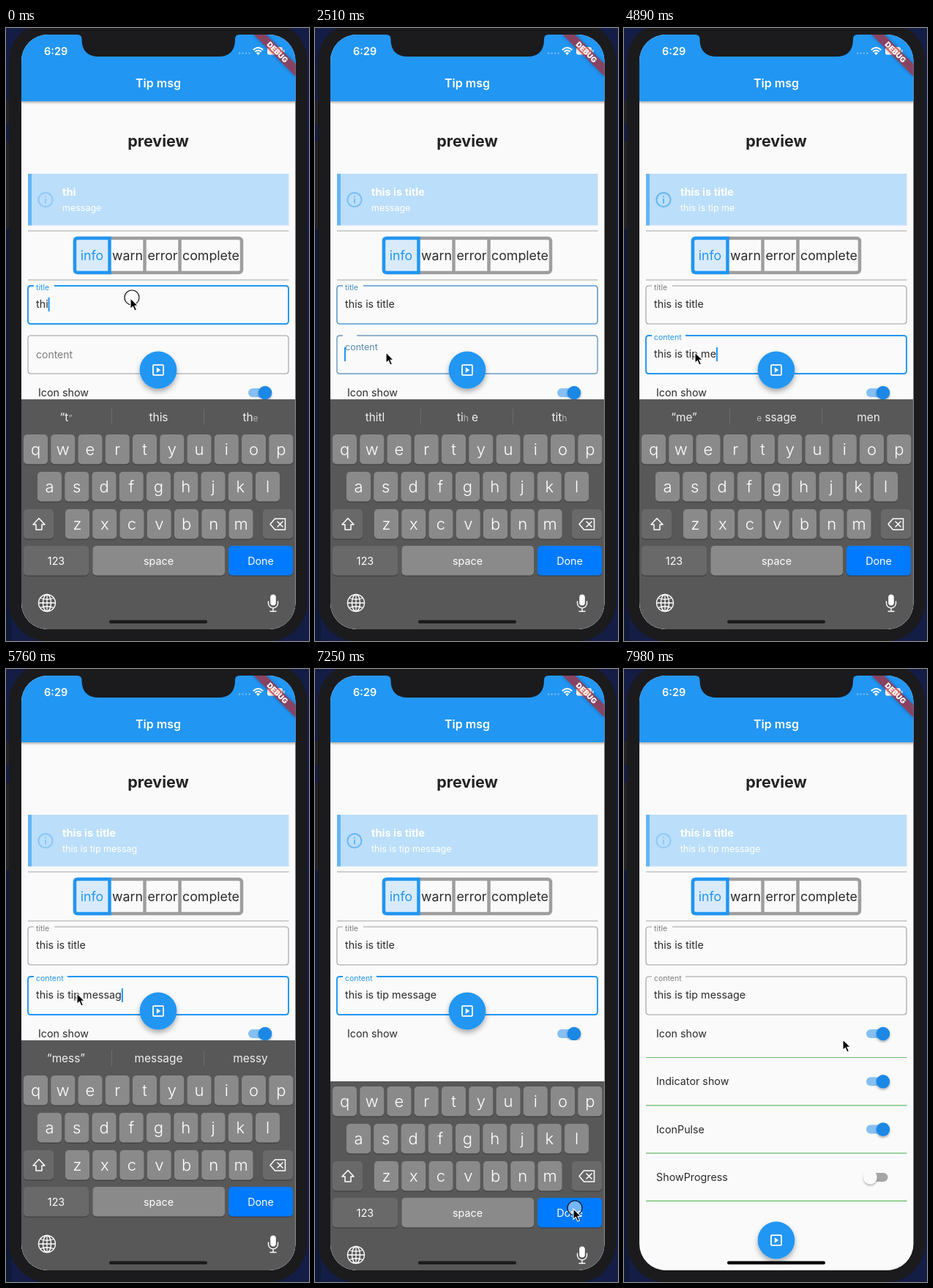
Write an HTML page that moves like this. It is 414 px wide and 837 px high and loops after 8 s.

```html
<!DOCTYPE html>
<html lang="en">
<head>
<meta charset="utf-8">
<title>Tip msg</title>
<style>
html, body { margin: 0; width: 100%; height: 100%; overflow: hidden; background: #10183a; }
svg { display: block; width: 414px; height: 837px; }
text { font: 14.3px Inter, sans-serif; fill: #2b2b2b; white-space: pre; }
.mid { text-anchor: middle; }
.key { font-size: 22px; font-weight: 300; fill: #fff; }
.word { font-size: 15.4px; fill: #f0f0f0; }
.dim { font-size: 12px; fill: #b0b0b0; }
</style>
</head>
<body>
<svg id="stage" viewBox="0 0 414 837"></svg>
<script>
const LOOP = 8000, STEP = 147.7;
const BLUE = [33, 150, 243], GREY = [158, 158, 158];

const rect = (x, y, w, h, fill, r = 0, extra = '') =>
  `<rect x="${x}" y="${y}" width="${w}" height="${h}" rx="${r}" fill="${fill}" ${extra}/>`;
const line = (x1, y1, x2, y2, color, width = 1) =>
  `<path d="M${x1} ${y1}L${x2} ${y2}" stroke="${color}" stroke-width="${width}"/>`;
const text = (x, y, str, style = '', attrs = '') =>
  `<text x="${x}" y="${y}" style="${style}" ${attrs}>${str}</text>`;
const midText = (x, y, str, style, cls = '') => text(x, y, str, style, `class="mid ${cls}"`);
const stroke = (d, color, width, extra = '') =>
  `<path d="${d}" fill="none" stroke="${color}" stroke-width="${width}" ${extra}/>`;

function statusBar() {
  const dots = [319, 323.5, 328, 332.5].map(x => `<circle cx="${x}" cy="34.5" r="1.2" fill="#fff" opacity=".35"/>`).join('');
  return text(52, 36.5, '6:29', 'font-size:14.5px;font-weight:600;fill:#fff') + dots +
    stroke('M337.8 30Q344.500 23.600 351.200 30M340.300 32.500Q344.500 28.600 348.700 32.500', '#fff', 2) +
    '<path d="M342 34.200Q344.500 32 347 34.200L344.500 37Z" fill="#fff"/>' +
    rect(357, 26, 21, 10.5, '#fff', 3) + rect(379, 29.5, 1.5, 4, '#fff', 1);
}

function banner() {
  return `<g transform="translate(395 9) rotate(45)">` +
    rect(-40, 28, 80, 12, '#b71c1c', 0, 'opacity=".68" filter="url(#soft)"') +
    midText(0, 37.7, 'DEBUG', 'font-size:10.2px;font-weight:900;fill:#fff') + '</g>';
}

function tipCard() {
  return rect(30, 199, 356.5, 70.5, '#bbdefb') + rect(30, 199, 5, 70.5, '#64b5f6') +
    `<g id="icon"><circle cx="54" cy="234.500" r="9.600" fill="none" stroke="#64b5f6" stroke-width="2"/>` +
    rect(53, 233, 2, 6.5, '#64b5f6') + rect(53, 229.3, 2, 2, '#64b5f6') + '</g>' +
    text(77, 229, '', 'font-size:14.6px;font-weight:700;fill:#fff', 'id="tipTitle"') +
    text(77, 250, '', 'font-size:12.5px;fill:#fff', 'id="tipBody"');
}

function kindButtons() {
  const label = (x, s, color) => midText(x, 317, s, `font-size:17.8px;fill:${color}`);
  return rect(94, 287, 228, 47, '#fafafa', 4, 'stroke="#9e9e9e" stroke-width="4.500"') +
    line(189.5, 287, 189.5, 334, '#9e9e9e', 4.5) + line(237.5, 287, 237.5, 334, '#9e9e9e', 4.5) +
    stroke('M141.500 287H98Q94 287 94 291V330Q94 334 98 334H141.500Z', '#2196f3', 4.5, 'style="fill:#d9ebfb"') +
    label(117.5, 'info', '#2196f3') + label(166, 'warn', '#2b2b2b') +
    label(214, 'error', '#2b2b2b') + label(280, 'complete', '#2b2b2b');
}

function field(id, y, value) {
  return `<path id="${id}Box" fill="none"/>` + text(41, 0, id, '', `id="${id}Label"`) +
    text(41, y + 30, value, '', `id="${id}Text"`) +
    rect(0, y + 16, 2, 19, '#2196f3', 0, `id="${id}Caret"`);
}

function optionRow(name, y, on) {
  const knob = on ? 354 : 336.5;
  return text(44, y + 5, name) +
    rect(331, y - 6, 29.5, 12, on ? '#86bff2' : '#a6a6a6', 6) +
    `<circle cx="${knob}" cy="${y}" r="9.300" fill="${on ? '#1e88e5' : '#fafafa'}" filter="url(#shade)"/>` +
    line(30, y + 32.5, 386.5, y + 32.5, '#66bb6a', 1.2);
}

function keyboard() {
  const cap = (x, y, w, fill = '#8a8a8a') => rect(x, y + 1, w, 41, '#444', 5) + rect(x, y, w, 40.5, fill, 5);
  const row = (letters, x0, y) => [...letters].map((c, i) =>
    cap(x0 + i * 37.25, y, 33) + midText(x0 + 16.5 + i * 37.25, y + 27.5, c, '', 'key')).join('');
  const white = (d, w = 1.5) => stroke(d, '#fff', w, 'stroke-linejoin="round" stroke-linecap="round"');
  const small = (x, s) => midText(x, 732.5, s, 'font-size:14.3px;fill:#fff');
  return rect(20, 548, 376, 300, '#585858') +
    `<g id="words">${rect(20, 507, 376, 42, '#585858')}` +
    line(144.5, 520, 144.5, 542, '#6c6c6c') + line(270.5, 520, 270.5, 542, '#6c6c6c') +
    [82, 208.5, 334].map((x, i) => midText(x, 537, '', '', `word" id="word${i}`)).join('') + '</g>' +
    row('qwertyuiop', 24, 555) + row('asdfghjkl', 43, 606) + row('zxcvbnm', 81, 657) +
    cap(24, 657, 41, '#696969') + white('M45 669.500L53 678H49V685H41V678H37Z') +
    cap(351, 657, 41, '#696969') + white('M361 677.500L367.500 670H381.500V685H367.500ZM371 674L378 681M378 674L371 681') +
    cap(24, 707, 89, '#696969') + small(68.5, '123') +
    cap(118.5, 707, 180.5) + small(208.5, 'space') +
    cap(304, 707, 88, '#007aff') + small(348, 'Done') +
    '<g fill="none" stroke="#fff" stroke-width="1.400"><circle cx="56" cy="785" r="11.500"/><ellipse cx="56" cy="785" rx="5.500" ry="11.500"/></g>' +
    white('M56 773.500V796.500M44.500 785H67.500M47 778.500Q56 782 65 778.500M47 791.500Q56 788 65 791.500', 1.3) +
    rect(361.2, 773.5, 7.6, 15, '#fff', 3.8) + white('M358.500 783V785.500A6.500 6.500 0 0 0 371.500 785.500V783M365 792V796.500M361 796.500H369', 1.4);
}

stage.innerHTML = `
<defs>
  <clipPath id="screen"><rect x="21" y="9" width="374.500" height="812" rx="36"/></clipPath>
  <filter id="shade" x="-50%" y="-50%" width="200%" height="200%"><feDropShadow dx="0" dy="2" stdDeviation="1.500" flood-opacity=".3"/></filter>
  <filter id="lift" x="-50%" y="-50%" width="200%" height="200%"><feDropShadow dx="0" dy="4" stdDeviation="3.500" flood-opacity=".32"/></filter>
  <filter id="soft" x="-20%" y="-60%" width="140%" height="220%"><feDropShadow dx="0" dy="0" stdDeviation="2.500" flood-opacity=".5"/></filter>
</defs>
${rect(0, 0, 414, 837, '#141d46')}${rect(0, 99, 8, 32, '#232327')}${rect(0, 155, 8, 119, '#232327')}${rect(0, 275, 8, 562, '#0f1a38')}
${rect(4, -9, 407.5, 847, '#1b1b1d', 55)}
<g clip-path="url(#screen)">
  ${rect(20, 9, 376, 813, '#fafafa')}
  ${rect(20, 9, 376, 91, '#2196f3', 0, 'filter="url(#shade)"')}
  ${statusBar()}
  ${midText(208, 80.5, 'Tip msg', 'font-size:16px;font-weight:600;fill:#fff')}
  ${midText(208, 161.5, 'preview', 'font-size:21.5px;font-weight:700;fill:#222')}
  ${tipCard()}
  ${line(30, 277, 386.5, 277, '#a3a3a3')}${line(30, 344, 386.5, 344, '#a3a3a3')}
  ${kindButtons()}
  ${field('title', 352, '')}${field('content', 420, '')}
  ${['Icon show', 'Indicator show', 'IconPulse', 'ShowProgress'].map((s, i) => optionRow(s, 498 + i * 65.3, i < 3)).join('')}
  ${rect(20, 0, 376, 400, '#fafafa', 0, 'id="cover"')}
  <g id="fab">
    <circle cx="208" cy="0" r="25.400" fill="#2196f3" filter="url(#lift)"/>
    ${rect(201, -6.8, 14, 13.6, 'none', 1, 'stroke="#fff" stroke-width="1.800"')}<path d="M205.800 -3.800L211.300 0L205.800 3.800Z" fill="#fff"/>
  </g>
  <g id="keys">${keyboard()}</g>
  ${rect(141, 808.5, 134, 4.5, '#1c1c1c', 2.2, 'id="homeBar"')}
  ${banner()}
</g>
<path d="M97 8V9Q103.500 9 103.500 15Q103.500 39 127 39H290Q313 39 313 15Q313 9 319 9V8Z" fill="#1b1b1d"/>
<g id="pointer">
  <circle id="ring" cx="2" cy="-1" r="10" fill="#fff" fill-opacity=".45" stroke="#111" stroke-width="1.200"/>
  <path d="M0 0V14.500L3.400 11.400L5.800 17L8.400 15.900L6 10.400H10.500Z" fill="#000" stroke="#fff" stroke-width="1.100"/>
</g>`;

const $ = id => document.getElementById(id);

// Steps at which each character appears.
const TITLE = 'this is title', TITLE_KEYS = [0, 0, 0, 1, 4, 5, 6, 9, 10, 11, 12, 13, 14];
const BODY = 'this is tip message', BODY_KEYS = [20, 21, 22, 23, 24, 25, 26, 27, 28, 29, 30, 31, 32, 33, 35, 36, 38, 39, 41];

// Suggestions by step; underscores mark faint letters.
const WORDS = [
  [0, '“t_”_', 'this', 'th_e_'], [2, '“this”', 'this', 'thistle'], [4, 'is', 'was', 'time'],
  [5, '“i”', 'is', 'in'], [7, '“is”', '_is_', 'iss_u_'], [8, '“is”', 'is', 'issue'],
  [9, 'a', 'the', 'not'], [10, '“t”', 'the', 'to'], [11, '“ti”', 'time', 'title'],
  [13, '“titl”', 'title', 'titled'], [14, '“title”', 'titles', 'titled'],
  [17, 'thitl', 'ti_h_ e', 'tit_h_'], [18, 'I', 'the', 'this'],
  [20, '“t”', 'the', 'to'], [22, '“thi”', 'this', 'the'], [23, '“this”', 'this', 'thistle'],
  [24, 'is', 'was', 'time'], [25, '“i”', 'is', 'in'], [26, '“is”', 'is', 'issue'],
  [27, 'a', 'the', 'not'], [28, '“t”', 'the', 'to'], [29, '“ti”', 'time', 'tip'],
  [30, '“tip”', 'tips', 'tipped'], [31, 'of', 'for', 'is'], [32, '“m”', 'me', 'my'],
  [33, '“me”', '_e_ ssage', 'men'], [34, '“me”', 'message', 'men'], [35, '“mes”', 'message', 'mess'],
  [36, '“mess”', 'message', 'messy'], [41, '“message”', 'messages', 'messaged']];

const POINTER = [[0, 170, 369], [13, 170, 369], [16, 97, 443], [43, 97, 443], [44, 198, 757],
  [47, 353, 737], [51, 353, 737], [53, 318, 570], [54, 299, 506]];
const CLICKS = [0, 16, 48, 49];

const lerp = (a, b, p) => a + (b - a) * p;
const mix = (a, b, p) => `rgb(${a.map((v, i) => Math.round(lerp(v, b[i], p)))})`;
const typed = (str, keys, k) => str.slice(0, keys.filter(at => at <= k).length);
const latest = (list, k) => list.filter(item => item[0] <= k).pop();

function along(path, k) {
  const i = path.findIndex(point => point[0] >= k);
  if (i < 1) return (i ? path[path.length - 1] : path[0]).slice(1);
  const [a, b] = [path[i - 1], path[i]], p = (k - a[0]) / (b[0] - a[0]);
  return [lerp(a[1], b[1], p), lerp(a[2], b[2], p)];
}

function drawField(id, y, value, focus, raised, labelWidth, caret) {
  const box = $(id + 'Box'), label = $(id + 'Label'), input = $(id + 'Text'), bar = $(id + 'Caret');
  const gapEnd = 38 + labelWidth * raised;
  box.setAttribute('d', `M${gapEnd} ${y}H382Q386 ${y} 386 ${y + 4}V${y + 48}Q386 ${y + 52} 382 ${y + 52}` +
    `H34Q30 ${y + 52} 30 ${y + 48}V${y + 4}Q30 ${y} 34 ${y}H38`);
  box.setAttribute('stroke', mix(GREY, BLUE, focus));
  box.setAttribute('stroke-width', 1.1 + 0.8 * focus);
  label.setAttribute('y', lerp(y + 31, y + 5.5, raised));
  label.style.fontSize = lerp(14, 10.5, raised) + 'px';
  label.style.fill = mix([125, 125, 125], BLUE, focus);
  input.textContent = value;
  bar.setAttribute('x', 41 + (value ? input.getComputedTextLength() : -1));
  bar.setAttribute('opacity', caret ? 1 : 0);
}

function draw(t) {
  const k = Math.floor((t + 8) / STEP);
  const title = typed(TITLE, TITLE_KEYS, k), body = typed(BODY, BODY_KEYS, k);
  $('tipTitle').textContent = title;
  $('tipBody').textContent = body || 'message';
  $('icon').setAttribute('opacity', 0.75 - 0.25 * Math.cos(k * STEP * Math.PI / 1000));

  const switched = k < 17 ? 0 : k === 17 ? 0.42 : 1;
  const blurred = k < 50 ? 0 : k === 50 ? 0.6 : 1;
  drawField('title', 352, title, 1 - switched, 1, 28, k < 17);
  drawField('content', 420, body, switched * (1 - blurred), switched, 46, k >= 17 && k < 47);

  latest(WORDS, k).slice(1).forEach((word, i) => {
    $('word' + i).innerHTML = word.replace(/_(.+?)_/g, '<tspan class="dim">$1</tspan>');
  });

  const bottom = k < 50 ? 507 : k === 50 ? 650 : k === 51 ? 800 : 820;
  const drop = k < 49 ? 0 : k === 49 ? 15 : k === 50 ? 170 : 314;
  $('cover').setAttribute('y', bottom);
  $('fab').setAttribute('transform', `translate(0 ${bottom - 40})`);
  $('keys').setAttribute('transform', `translate(0 ${drop})`);
  $('words').setAttribute('visibility', k < 49 ? 'visible' : 'hidden');
  $('homeBar').setAttribute('fill', k < 51 ? '#1c1c1c' : '#000');

  $('pointer').setAttribute('transform', `translate(${along(POINTER, k)})`);
  $('ring').setAttribute('opacity', CLICKS.includes(k) ? 1 : 0);
}

const start = performance.now();
function tick() {
  draw((performance.now() - start) % LOOP);
  requestAnimationFrame(tick);
}
tick();
</script>
</body>
</html>
```
